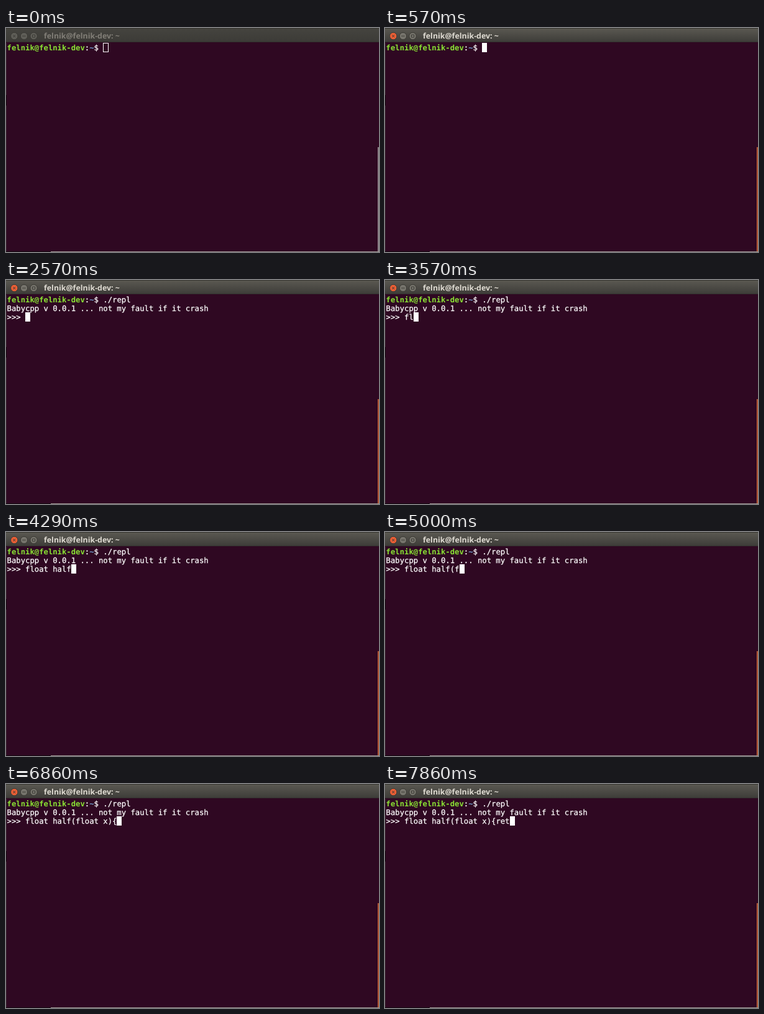
Recreate the animation shown at these times as an HTML page. Size 600 by 361 pixels, loop 8 s.

```html
<!DOCTYPE html>
<html lang="en">
<head>
<meta charset="utf-8">
<title>Terminal</title>
<style>
  html, body { margin: 0; width: 100%; height: 100%; overflow: hidden; background: #300a24; }
  #stage { position: relative; width: 600px; height: 361px; overflow: hidden; background: #2f0822; }
  #stage::before {
    content: ""; position: absolute; left: 0; top: 24px; width: 1px; height: 337px;
    background: linear-gradient(#3a2733 84px, #150c12 84px 101px, #3a2733 101px);
  }
  #bar {
    position: absolute; left: 0; top: 0; width: 600px; height: 23px; box-sizing: border-box;
    border-top: 1px solid #35342f; border-bottom: 1px solid #33302e;
    background: linear-gradient(#5a5851, #3e3d39);
    color: #dfdbd2; font: 700 12.4px/24px "Open Sans", "Noto Sans", sans-serif;
    text-rendering: geometricPrecision;
  }
  #bar span { position: absolute; left: 61px; top: 0; white-space: pre; }
  #bar svg { position: absolute; left: 0; top: -1px; }
  .button { fill: #76746c; stroke: #3a3934; }
  .close { fill: #ec5f35; }
  .sign { fill: none; stroke: #3b3a35; }
  .line {
    position: absolute; left: 1.6px; height: 14px; white-space: pre; color: #fff;
    font: 12.24px/14px "DejaVu Sans Mono", monospace; text-rendering: geometricPrecision;
    -webkit-text-stroke: 0.25px;
  }
  .line b { color: #8ae234; -webkit-text-stroke: 0; }
  .line b.path { color: #729fcf; }
  #cursor {
    position: absolute; width: 8px; height: 15px; box-sizing: border-box; background: #fff;
  }
  #scroll {
    position: absolute; left: 598px; top: 192px; width: 2px; height: 168px;
    background: linear-gradient(90deg, #e0703f 1px, #8a4530 1px);
  }
  #edge {
    position: absolute; left: 0; top: 360px; width: 600px; height: 1px;
    background: linear-gradient(90deg, #120a10 72px, #a09c96 72px);
  }
  .idle #bar { background: linear-gradient(#45443f, #3c3b37); color: #817e77; }
  .idle .button { fill: #5f5e58; }
  .idle #scroll { background: linear-gradient(90deg, #aaa1a7 1px, #6f666c 1px); }
  .idle #cursor { background: none; border: 1px solid #fff; width: 9px; }
</style>
</head>
<body>
<div id="stage" class="idle">
  <div id="bar">
    <svg width="60" height="24">
      <circle class="button close" cx="13.3" cy="13" r="5.7"/>
      <circle class="button" cx="29" cy="13" r="5.7"/>
      <circle class="button" cx="44.6" cy="13" r="5.7"/>
      <path class="sign" d="M11.3 11l4 4m0-4l-4 4M26.3 13h5.4M42.5 11h4.2v4h-4.2z"/>
    </svg>
    <span>felnik@felnik-dev: ~</span>
  </div>
  <div class="line" style="top:25px"><b>felnik@felnik-dev</b>:<b class="path">~</b>$ <span id="command"></span></div>
  <div class="line" id="banner" style="top:39px">Babycpp v 0.0.1 ... not my fault if it crash</div>
  <div class="line" id="repl" style="top:53px">&gt;&gt;&gt; <span id="input"></span></div>
  <div id="cursor"></div>
  <div id="scroll"></div>
  <div id="edge"></div>
</div>
<script>
const LOOP = 8000, FOCUS = 570, ENTER = 2430, BLINK = 600, MARGIN = 1.6, ADVANCE = 7.37;
const $ = id => document.getElementById(id);

// Key times for a run of characters, evenly spaced
const run = (text, start, end) => [...text].map((char, i) => ({
  char, at: start + (end - start) * i / Math.max(1, text.length - 1)
}));
const shellKeys = run("./repl", 1570, 2270);
const replKeys = [
  ...run("float half", 3430, 4270),
  ...run("(float ", 4850, 5640),
  ...run("x){", 6140, 6780),
  ...run("ret", 7280, 7770)
];
const events = [FOCUS, ENTER, ...[...shellKeys, ...replKeys].map(key => key.at)];
const typed = (keys, t) => keys.filter(key => key.at <= t).map(key => key.char).join("");

function draw(now) {
  const t = now % LOOP;
  const focused = t >= FOCUS, running = t >= ENTER;
  const command = typed(shellKeys, t), input = typed(replKeys, t);

  $("stage").className = focused ? "" : "idle";
  $("command").textContent = command;
  $("input").textContent = input;
  $("banner").hidden = $("repl").hidden = !running;

  const column = running ? 4 + input.length : 21 + command.length;
  const lastEvent = Math.max(...events.filter(at => at <= t));
  const lit = !focused || (t - lastEvent) % (2 * BLINK) < BLINK;
  const cursor = $("cursor").style;
  cursor.left = Math.round(MARGIN + column * ADVANCE) + "px";
  cursor.top = running ? "52px" : "24px";
  cursor.visibility = lit ? "visible" : "hidden";
}

const start = performance.now();
function tick() {
  draw(performance.now() - start);
  requestAnimationFrame(tick);
}
tick();
</script>
</body>
</html>
```
